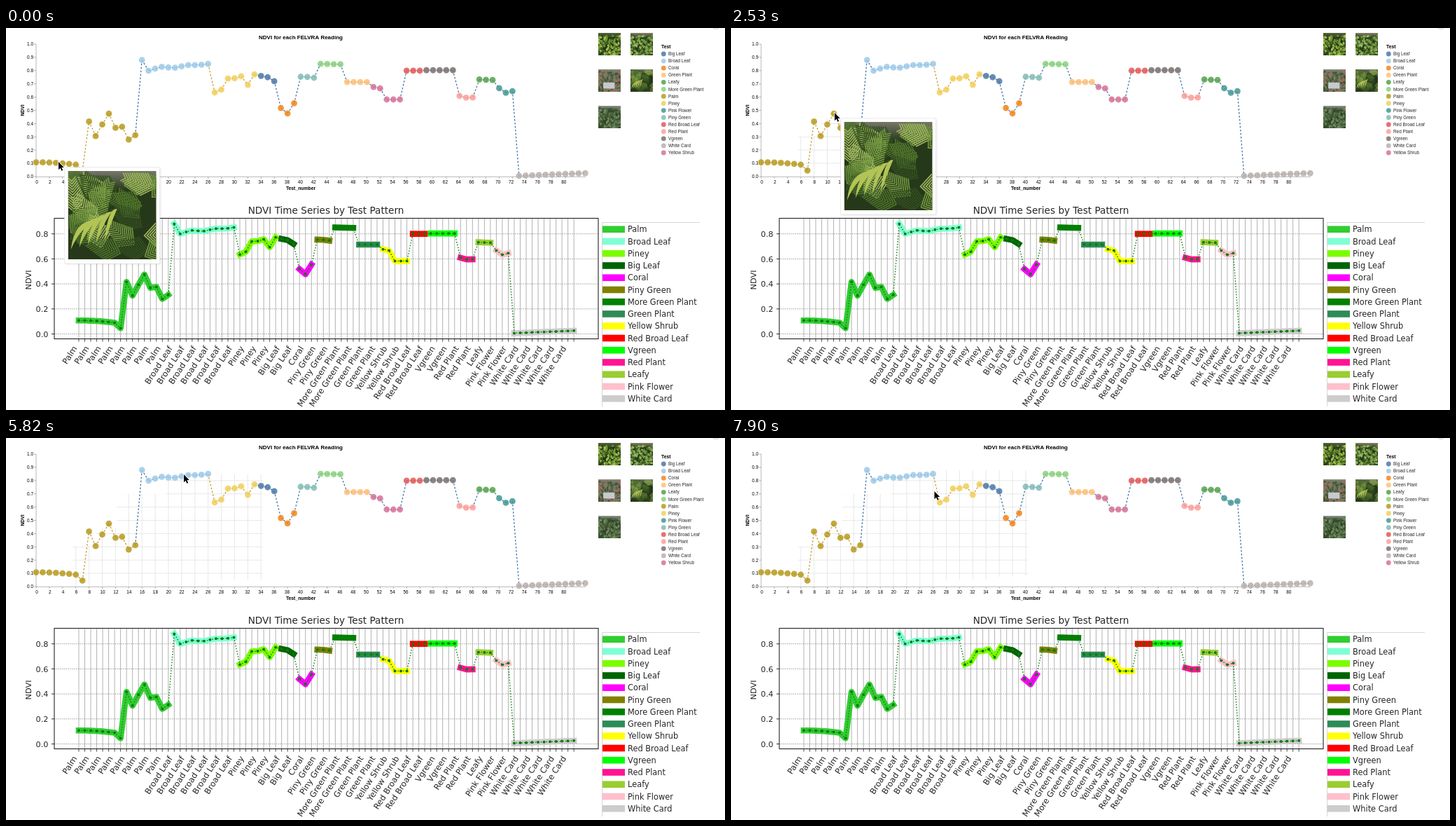
Animation of 1027x545 px, one loop 8000 ms. Source, as an HTML page with a canvas:

```html
<!DOCTYPE html>
<html lang="en">
<head>
<meta charset="utf-8">
<title>NDVI readings</title>
<style>
  html, body { margin: 0; height: 100%; overflow: hidden; background: #fff; }
  canvas { display: block; }
</style>
</head>
<body>
<canvas id="stage" width="1027" height="545"></canvas>
<script>
const c = document.getElementById('stage').getContext('2d');
const LOOP = 8000, TICK = 148.9;
const SANS = '"Liberation Sans", sans-serif', DEJA = '"DejaVu Sans", sans-serif';

const curve = (a, b = 0, d = 0) => k => a + b * k + d * k * k;
const palmPeaks = [.046, .416, .306, .393, .475, .368, .376, .28, .313];
const pineyRise = [.635, .657, .74, .742, .757, .693, .772];

// name, number of readings, upper colour, lower colour, NDVI of the k-th reading
const groups = [
  ['Palm', 16, '#b79a20', '#32cd32', k => k < 7 ? .108 - .0005 * k * k : palmPeaks[k - 7]],
  ['Broad Leaf', 11, '#9ecae9', '#7fffd4',
    k => k ? .806 + .0045 * k - .012 * (1 - k / 11) * Math.sin(k * Math.PI / 2) : .88],
  ['Piney', 7, '#f2cf5b', '#7cfc00', k => pineyRise[k]],
  ['Big Leaf', 3, '#4c78a8', '#006400', curve(.76, 0, -.01)],
  ['Coral', 3, '#f58518', '#ff00ff', curve(.518, -.1, .059)],
  ['Piny Green', 3, '#83bcb6', '#808000', curve(.754, 0, -.002)],
  ['More Green Plant', 4, '#88d27a', '#008000', curve(.851, -.001)],
  ['Green Plant', 4, '#ffbf79', '#2e8b57', curve(.714)],
  ['Yellow Shrub', 5, '#d67195', '#ffff00', k => k < 2 ? .677 - .011 * k : .582],
  ['Red Broad Leaf', 3, '#e45756', '#ff0000', curve(.8)],
  ['Vgreen', 5, '#79706e', '#00ff00', curve(.803)],
  ['Red Plant', 3, '#ff9d98', '#ff1493', curve(.609, -.02, .007)],
  ['Leafy', 3, '#54a24b', '#9acd32', curve(.733, -.002)],
  ['Pink Flower', 3, '#439894', '#ffc0cb', curve(.667, -.058, .0235)],
  ['White Card', 11, '#bab0ac', '#cccccc', curve(.006, .002)]
].map(([name, count, top, low, value]) => ({ name, count, top, low, value }));

const owner = [], ndvi = [];
for (const g of groups) {
  g.start = ndvi.length;
  for (let k = 0; k < g.count; k++) {
    owner.push(g);
    ndvi.push(g.value(k));
  }
}

// pointer glides: first tick, last tick, end x, end y
const glides = [
  [3, 4, 87, 194], [4, 5, 97, 156], [5, 9, 120, 133], [13, 17, 148, 121],
  [21, 22, 150, 122], [22, 23, 186, 81], [23, 27, 218, 56], [28, 30, 220, 53],
  [34, 39, 254, 52], [39, 41, 257, 49], [43, 46, 278, 47], [50, 53, 290.5, 76]
];

// ticks during which a reading is hovered
const hovers = [[0, 5], [8, 14], [16, 23], [29, 35], [40, 44], [46, 47]];

function pointerAt(tick) {
  let x = 75, y = 191;
  for (const [from, to, endX, endY] of glides) {
    const p = Math.min(1, Math.max(0, (tick - from) / (to - from)));
    x += (endX - x) * p;
    y += (endY - y) * p;
  }
  return { x, y };
}

const topX = i => 43 + 9.45 * i, topY = v => 212 - 189 * v;
const lowX = i => 104 + 8.52 * i, lowY = v => 436.5 - 178.5 * v;

function line(points, color, width, dash = []) {
  c.beginPath();
  for (const [x, y] of points) c.lineTo(x, y);
  c.strokeStyle = color;
  c.lineWidth = width;
  c.setLineDash(dash);
  c.stroke();
  c.setLineDash([]);
}

function dot(x, y, r, color) {
  c.beginPath();
  c.arc(x, y, r, 0, 7);
  c.fillStyle = color;
  c.fill();
}

function text(str, x, y, font, align = 'left', angle = 0, color = '#000') {
  c.save();
  c.translate(x, y);
  c.rotate(angle * Math.PI / 180);
  c.font = font;
  c.textAlign = align;
  c.fillStyle = color;
  c.fillText(str, 0, 0);
  c.restore();
}

function randomizer(seed) {
  return () => (seed = seed * 16807 % 2147483647) / 2147483647;
}

const photos = {
  palm: { sky: '#77786a', ground: '#26381a', leaves: ['#4d712b', '#739640', '#9bb35c', '#344f20'] },
  broad: { sky: '#8b8270', ground: '#25381a', leaves: ['#3b5c22', '#587f32', '#7da048', '#9bb763'] },
  bright: { sky: '#59663f', ground: '#22321a', leaves: ['#3b5a20', '#6c922f', '#a2bd4c'] },
  coral: { sky: '#8d8878', ground: '#5b6454', leaves: ['#3e5632', '#6f8060', '#a8695c'], pot: '#c3cbd0' },
  bush: { sky: '#949790', ground: '#30432a', leaves: ['#3c5530', '#567048', '#728a60'] }
};

function frond(x, y, angle, color) {
  c.save();
  c.translate(x, y);
  c.rotate(angle);
  for (let d = 0; d < 46; d += 4) {
    const reach = 17 - d / 4;
    line([[d + reach, -reach], [d, 0], [d + reach, reach]], color, 1.7);
  }
  c.restore();
}

function photo(kind, x, y, size) {
  const p = photos[kind], rnd = randomizer(7919);
  c.save();
  c.beginPath();
  c.rect(x, y, size, size);
  c.clip();
  c.translate(x, y);
  c.scale(size / 126, size / 126);
  const shade = c.createLinearGradient(0, 0, 0, 126);
  shade.addColorStop(0, p.sky);
  shade.addColorStop(0.22, p.ground);
  c.fillStyle = shade;
  c.fillRect(0, 0, 126, 126);
  const palm = kind === 'palm', count = palm ? 26 : 130;
  for (let i = 0; i < count; i++) {
    const px = rnd() * 126, py = 16 + 110 * i / count, turn = rnd() * 3;
    const color = p.leaves[i % p.leaves.length];
    if (palm) {
      frond(px, py, -turn, color);
    } else {
      c.beginPath();
      c.ellipse(px, py, 9, 6, turn, 0, 7);
      c.fillStyle = color;
      c.fill();
    }
  }
  // long pale blades hanging to the lower left
  for (let i = 0; palm && i < 5; i++) {
    const bx = 4 + 12 * i, by = 112 - 3 * i, tx = 42 + 7 * i, ty = 70 - 4 * i;
    c.beginPath();
    c.moveTo(tx, ty);
    c.quadraticCurveTo(bx + 5, ty - 2, bx, by);
    c.quadraticCurveTo(bx + 14, ty + 9, tx, ty);
    c.fillStyle = '#b2c455';
    c.fill();
  }
  if (p.pot) {
    c.fillStyle = p.pot;
    c.fillRect(28, 74, 64, 34);
  }
  c.restore();
}

// the grid shows wherever a closed tooltip has wiped over it
function grid(tick) {
  c.save();
  c.beginPath();
  for (const [, end] of hovers) {
    if (tick < end) continue;
    const last = pointerAt(end - 1), next = pointerAt(end);
    c.rect(last.x + 8.5, next.y - 1, 138, Math.min(212, last.y + 150) - next.y);
  }
  c.clip();
  for (let i = 0; i <= 82; i += 2) line([[topX(i), 23], [topX(i), 212]], '#e2e2e2', 0.8);
  for (let k = 0; k <= 10; k++) line([[43, topY(k / 10)], [828, topY(k / 10)]], '#e2e2e2', 0.8);
  c.restore();
}

function upperChart() {
  const small = '6.4px ' + SANS, bold = 'bold 6.8px ' + SANS;
  line([[43, 23], [43, 212.3], [828, 212.3]], '#999', 0.7);
  for (let k = 0; k <= 10; k++) {
    const y = topY(k / 10);
    line([[40, y], [43, y]], '#999', 0.7);
    text((k / 10).toFixed(1), 39, y + 2.3, small, 'right');
  }
  for (let i = 0; i <= 80; i += 2) {
    line([[topX(i), 212], [topX(i), 215]], '#999', 0.7);
    text(i, 44 + 9.41 * i, 221.5, small, 'center');
  }
  text('NDVI for each FELVRA Reading', 421, 15.6, 'bold 8px ' + SANS, 'center');
  text('Test_number', 421, 231.3, bold, 'center');
  text('NDVI', 26, 117.5, bold, 'center', -90);

  for (let i = 1; i < ndvi.length; i++) {
    const gold = /^(Palm|Piney)$/.test(owner[i].name);
    line([[topX(i - 1), topY(ndvi[i - 1])], [topX(i), topY(ndvi[i])]],
      gold ? '#bf9c2c' : '#3f72a8', 1.25, [2.6, 2.4]);
  }
  c.globalAlpha = 0.85;
  ndvi.forEach((v, i) => dot(topX(i), topY(v), 4.4, owner[i].top));

  [...groups].sort((a, b) => a.name < b.name ? -1 : 1).forEach((g, k) => {
    const y = 37 + 10.07 * k;
    dot(939.3, y, 3.4, g.top);
    text(g.name, 946, y + 2.2, small);
  });
  c.globalAlpha = 1;
  text('Test', 936, 29, bold);

  ['bright', 'broad', 'coral', 'palm', 'bush'].forEach((kind, i) =>
    photo(kind, 846 + 46 * (i % 2), 7 + 52 * Math.floor(i / 2), 32));
  c.beginPath();
  c.arc(1014, -5, 6.5, 0.5, 2.6);
  c.strokeStyle = '#ccc';
  c.lineWidth = 1;
  c.stroke();
}

function lowerChart() {
  const font = '11.3px ' + DEJA, ink = '#262626';
  ndvi.forEach((v, i) => {
    line([[lowX(i), 271.5], [lowX(i), 443.5]], '#b2b2b2', 1);
    line([[lowX(i), 443.5], [lowX(i), 447.5]], '#333', 0.9);
    if (i % 2 === 0) text(owner[i].name, lowX(i) - 2, 457, '11.6px ' + DEJA, 'right', -57, ink);
  });
  for (let k = 0; k <= 4; k++) {
    const y = lowY(k / 5);
    line([[69, y], [846, y]], '#a4a4a4', 1, [1.6, 1.2]);
    line([[65, y], [69, y]], '#333', 1);
    text((k / 5).toFixed(1), 60.5, y + 4.2, font, 'right', 0, ink);
  }

  const pts = ndvi.map((v, i) => [lowX(i), lowY(v)]);
  c.lineCap = 'square';
  c.lineJoin = 'round';
  for (const g of groups) line(pts.slice(g.start, g.start + g.count), g.low, 8.6);
  c.lineCap = 'butt';
  line(pts, '#118011', 1.5, [1.5, 2.4]);
  for (const [x, y] of pts) dot(x, y, 2, '#0a7a0a');
  c.lineJoin = 'miter';

  c.strokeStyle = '#222';
  c.lineWidth = 1.1;
  c.strokeRect(69, 271.5, 777, 172);
  text('NDVI Time Series by Test Pattern', 457, 264.5, '13.6px ' + DEJA, 'center', 0, ink);
  text('NDVI', 36, 359.5, font, 'center', -90, ink);

  line([[991, 277.5], [851.5, 277.5], [851.5, 540]], '#d6d6d6', 1);
  groups.forEach((g, k) => {
    const y = 287.2 + 17.25 * k;
    line([[852, y], [884, y]], g.low, 9.6);
    text(g.name, 888, y + 4.2, '11.4px ' + DEJA, 'left', 0, ink);
  });
}

function tooltip(kind, x, y) {
  c.save();
  c.shadowColor = 'rgba(0,0,0,0.12)';
  c.shadowBlur = 3;
  c.shadowOffsetX = c.shadowOffsetY = 1;
  c.fillStyle = '#fff';
  c.fillRect(x, y, 136, 137);
  c.restore();
  c.strokeStyle = '#e6e6e6';
  c.lineWidth = 0.8;
  c.strokeRect(x, y, 136, 137);
  photo(kind, x + 5, y + 5, 126);
}

function pointer(x, y) {
  c.beginPath();
  for (const [dx, dy] of [[0, 0], [0, 11.2], [2.6, 8.8], [4.4, 12.8], [6.2, 12], [4.5, 8.1], [7.8, 7.9]])
    c.lineTo(x + dx, y + dy);
  c.closePath();
  c.strokeStyle = '#fff';
  c.lineWidth = 1.6;
  c.stroke();
  c.fillStyle = '#000';
  c.fill();
}

function draw(t) {
  const tick = Math.floor((t + 5) / TICK), { x, y } = pointerAt(tick);
  c.fillStyle = '#fff';
  c.fillRect(0, 0, 1027, 545);
  grid(tick);
  upperChart();
  lowerChart();
  if (hovers.some(([from, to]) => tick >= from && tick < to))
    tooltip(x < topX(15.5) ? 'palm' : 'broad', x + 8.7, y + 8);
  pointer(x, y);
}

const begin = performance.now();
function loop() {
  draw((performance.now() - begin) % LOOP);
  requestAnimationFrame(loop);
}
loop();
</script>
</body>
</html>
```
